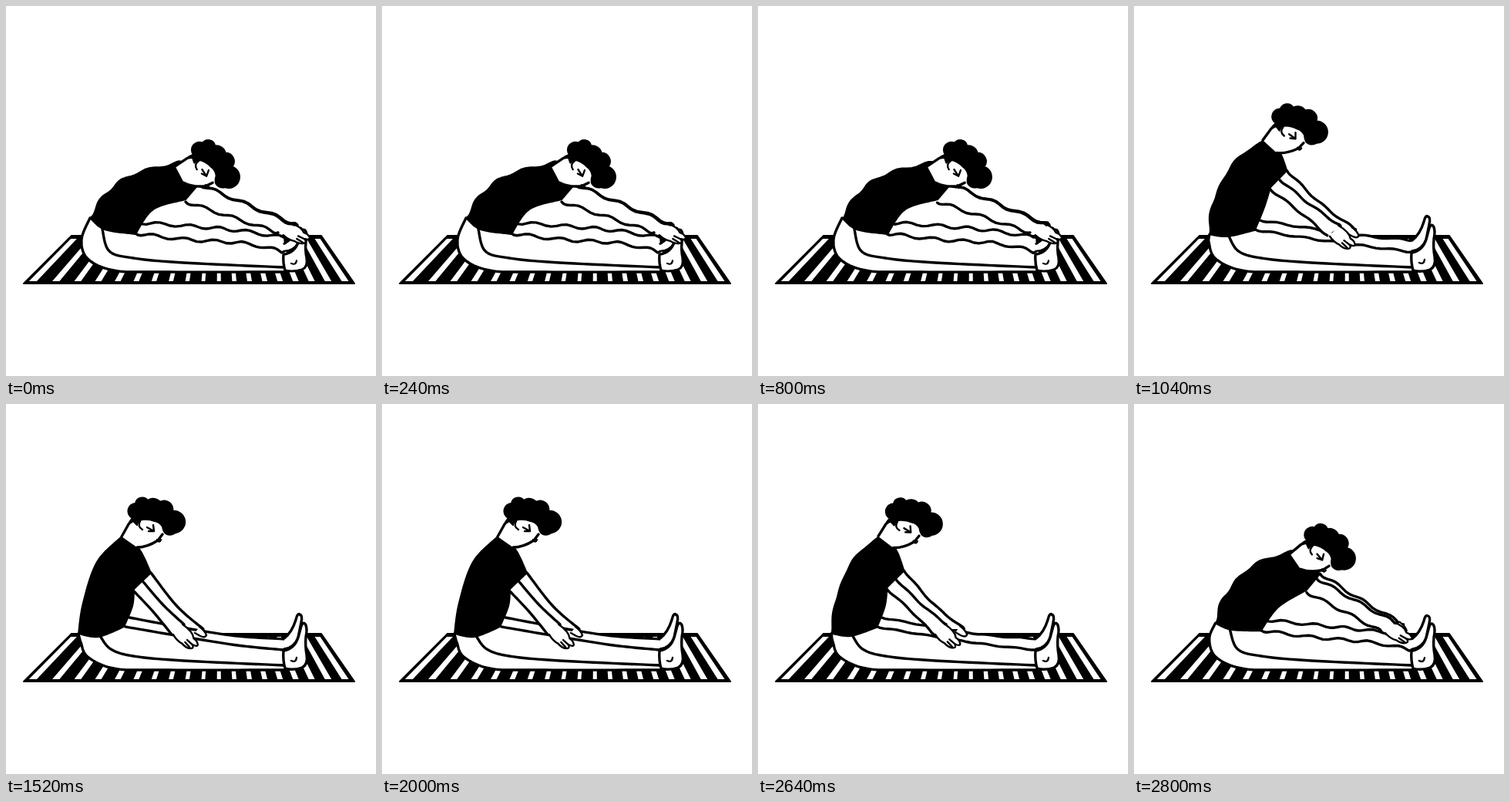
An HTML page that plays this animation: 480 px wide and 480 px high, repeating every 2.88 s.

```html
<!DOCTYPE html>
<html lang="en">
<head>
<meta charset="utf-8">
<title>Seated stretch</title>
<style>
  html, body { margin: 0; width: 100%; height: 100%; overflow: hidden; background: #fff; }
  svg { display: block; width: 100%; height: 100%; }
  .line { fill: none; stroke: #000; stroke-width: 3.4; stroke-linecap: round; stroke-linejoin: round; }
  .fine { stroke-width: 2.4; }
  .skin { fill: #fff; }
  .ink { fill: #000; stroke: #000; stroke-width: 2; stroke-linejoin: round; }
  .line.skin { fill: #fff; }
</style>
</head>
<body>
<svg viewBox="0 0 480 480">
  <path class="ink" d="M85 298H409L452 360H23Z"/>
  <path id="stripes" class="skin"/>
  <path id="legs" class="skin"/>
  <path id="seat" class="line"/>
  <path id="farLeg" class="line"/>
  <path id="farFoot" class="line skin" d="M361 304Q371 296 376 280Q378 271 381 273Q385 274 383 283L379 303Q374 316 361 318"/>
  <path id="nearLeg" class="line"/>
  <path id="underLeg" class="line"/>
  <g id="nearFoot">
    <path class="line skin" d="M360 320Q374 318 379 303L383 288Q386 281 389 287Q391 292 389 302Q388 315 390 325Q392 338 384 342Q372 346 362 343Q359 332 360 320Z"/>
    <path class="line fine" d="M370 333Q376 336 377 329"/>
  </g>
  <path id="farArmFill" class="skin"/>
  <path id="farArm" class="line"/>
  <path id="farHand" class="line fine skin" d="M-5 -3Q2 2 4 8Q2 12 -4 9L-11 5"/>
  <path id="nearArmFill" class="skin"/>
  <g id="hand">
    <path class="line fine skin" d="M0 9Q9 12 16 10Q25 11 29 7Q32 4 27 2Q35 0 32 -3Q28 -6 23 -5Q17 -11 0 -9"/>
    <path class="line fine" d="M27 2L18 2M27 7L18 6"/>
  </g>
  <path id="armLow" class="line"/>
  <path id="armTop" class="line"/>
  <path id="torso" class="ink"/>
  <g id="head">
    <path class="skin" d="M-45 25L-36 8L-25 1L5 8L9 22L2 30L-10 37L-25 39Z"/>
    <path class="line" d="M-45 25L-36 9M-25 39Q-12 39 2 30L8 22"/>
    <path class="ink" d="M-37 10Q-34 4 -31 1A10 10 0 0 1 -27 -18A9 9 0 0 1 -11 -22A12 12 0 0 1 5 -20A11 11 0 0 1 21 -8A14 14 0 0 1 25 20Q18 25 12 21Q9 18 8 12Q4 6 -2 5Q-10 2 -18 3Q-24 4 -25 10L-30 5Z"/>
    <path class="line fine" d="M-21 5Q-25 12 -18 16M-12 13L-3 18M-4 10L-3 18L-10 18M1 29Q4 34 6 29"/>
  </g>
</svg>
<script>
const LOOP = 2880, STEP = 80;
const el = id => document.getElementById(id);
const mix = (a, b, k) => a + (b - a) * k;
const mixPoint = (a, b, k) => a.map((v, i) => mix(v, b[i], k));
const smooth = u => (u = Math.max(0, Math.min(1, u)), u * u * (3 - 2 * u));

// Smooth curve through points, with a ripple across it
function curve(pts, height = 0, phase = 0) {
  const out = [], last = pts.length - 1, detail = 12;
  const at = i => pts[Math.max(0, Math.min(last, i))];
  let run = 0;
  for (let i = 0; i < last; i++) {
    const [a, b, c, d] = [-1, 0, 1, 2].map(o => at(i + o));
    const dx = c[0] - b[0], dy = c[1] - b[1], len = Math.hypot(dx, dy) || 1;
    for (let j = 0; j < detail; j++) {
      const u = j / detail;
      const w = height * Math.sin((run + u * len) * 2 * Math.PI / 37 + phase);
      const [x, y] = [0, 1].map(k => b[k] + .5 * u * (c[k] - a[k] +
        u * (2 * a[k] - 5 * b[k] + 4 * c[k] - d[k] + u * (3 * (b[k] - c[k]) + d[k] - a[k]))));
      out.push([x - dy / len * w, y + dx / len * w]);
    }
    run += len;
  }
  return [...out, pts[last]];
}

const path = pts => "M" + pts.map(p => p.map(v => v.toFixed(2)).join(" ")).join("L");
const draw = (id, pts) => el(id).setAttribute("d", path(pts));
const between = (id, a, b) => draw(id, [...a, ...b.slice().reverse()]);
const place = (id, [x, y], turn = 0) =>
  el(id).setAttribute("transform", `translate(${x} ${y}) rotate(${turn})`);
const squash = (id, base, k) =>
  el(id).setAttribute("transform", `translate(0 ${base * (1 - k)}) scale(1 ${k})`);

function drawStripes() {
  const count = 19, top = 302, bottom = 357;
  const project = (x, y) => [mix(x, 85 + (x - 23) * 324 / 429, (360 - y) / 62), y];
  let d = "";
  for (let i = 0; i < count; i++) {
    const u = i / (count - 1);
    const x = 32 + 410 * u + 150 * u * (1 - u) ** 2;
    const half = 2.4 + Math.abs(x - 260) / 85;
    d += path([project(x - half, bottom), project(x - half, top),
      project(x + half, top), project(x + half, bottom)]) + "Z";
  }
  el("stripes").setAttribute("d", d);
}

// 0 sitting upright, 1 folded over the legs
const foldAt = t => t < 1800 ? 1 - smooth((t - 800) / 360) : smooth((t - 2580) / 320);

function drawLegs(go, fold, wave, phase, hemBack) {
  const far = curve([go([160, 277], [174, 281]), go([240, 292], [245, 286]),
    go([300, 301], [300, 291]), go([362, 305], [360, 300])], wave, phase);
  const near = curve([go([155, 289], [168, 295]), go([225, 301], [235, 303]),
    go([300, 313], [310, 308]), [360, 319]], wave, phase);
  const under = curve([go([122, 301], [125, 290]), go([136, 318], [134, 318]),
    [165, 327], [230, 333], [361, 339]]);
  const seat = curve([hemBack, go([97, 309], [98, 303]), [106, 328], [140, 343], [200, 345], [364, 345]]);
  between("legs", far, seat);
  draw("seat", seat);
  draw("farLeg", far);
  draw("nearLeg", near);
  draw("underLeg", under);
  squash("farFoot", 318, 1 - .32 * fold ** 8);
  squash("nearFoot", 342, 1 - .1 * fold ** 8);
}

function drawArms(go, fold, wave, phase, armpit, sleeve) {
  const arm = (from, to, sag) => {
    const [x, y] = mixPoint(from, to, .5);
    return curve([from, [x, y + sag * (1 - fold)], to], wave, phase);
  };
  const lowWrist = go([215, 299], [353, 294]);
  const topWrist = go([231, 286], [374, 284]);
  const farWrist = go([256, 292], [378, 284]);
  const low = arm([armpit[0], armpit[1] + 3], lowWrist, -2);
  const top = arm(mixPoint(armpit, sleeve, .5 + .5 * fold ** 3), topWrist, 3);
  const far = arm(sleeve, farWrist, 7);
  between("farArmFill", top, far);
  between("nearArmFill", low, top);
  draw("armLow", low);
  draw("armTop", top);
  draw("farArm", far);
  place("farHand", farWrist);
  place("hand", mixPoint(lowWrist, topWrist, .5), 42 - 17 * fold);
}

function render(now) {
  const t = Math.floor(now % LOOP / STEP) * STEP;
  const fold = foldAt(t), swing = smooth(fold);
  const wave = 2 * Math.sqrt(fold);
  const phase = fold === 1 ? t / STEP % 3 * .7 : 0;
  const breath = fold === 0 && t % 240 !== STEP ? 2 : 0;
  const arch = fold * (1 - fold);

  const go = (a, b, kx = fold, ky = fold, rise = 0) =>
    [mix(a[0], b[0], kx), mix(a[1], b[1], ky) - rise];
  const hemBack = go([94, 298], [109, 275], fold, fold ** 2);
  const hemFront = go([153, 289], [168, 296]);
  const nape = go([150, 172], [228, 202], fold, fold ** 2, breath);
  const chest = go([172, 187], [236, 218], fold, fold ** 2, breath);
  const sleeve = go([188, 219], [250, 231], swing, fold, 45 * arch);
  const armpit = go([166, 240], [233, 251], swing, fold, 40 * arch);

  const ripple = wave * .8;
  draw("torso", [
    ...curve([hemBack, go([100, 258], [130, 243], fold ** 2, fold ** 2),
      go([118, 205], [166, 218], fold, fold ** 2, 20 * arch), nape], ripple, phase),
    ...curve([nape, chest, sleeve]),
    ...curve([armpit, go([164, 262], [191, 264], swing), hemFront]),
    ...curve([hemFront, go([120, 302], [128, 290]), hemBack])
  ]);
  drawLegs(go, fold, wave, phase, hemBack);
  drawArms(go, fold, wave, phase, armpit, sleeve);
  place("head", go([195, 147], [271, 206], fold, fold ** 1.5, breath), 27 * fold);
}

function tick() {
  render(performance.now());
  requestAnimationFrame(tick);
}

drawStripes();
tick();
</script>
</body>
</html>
```
